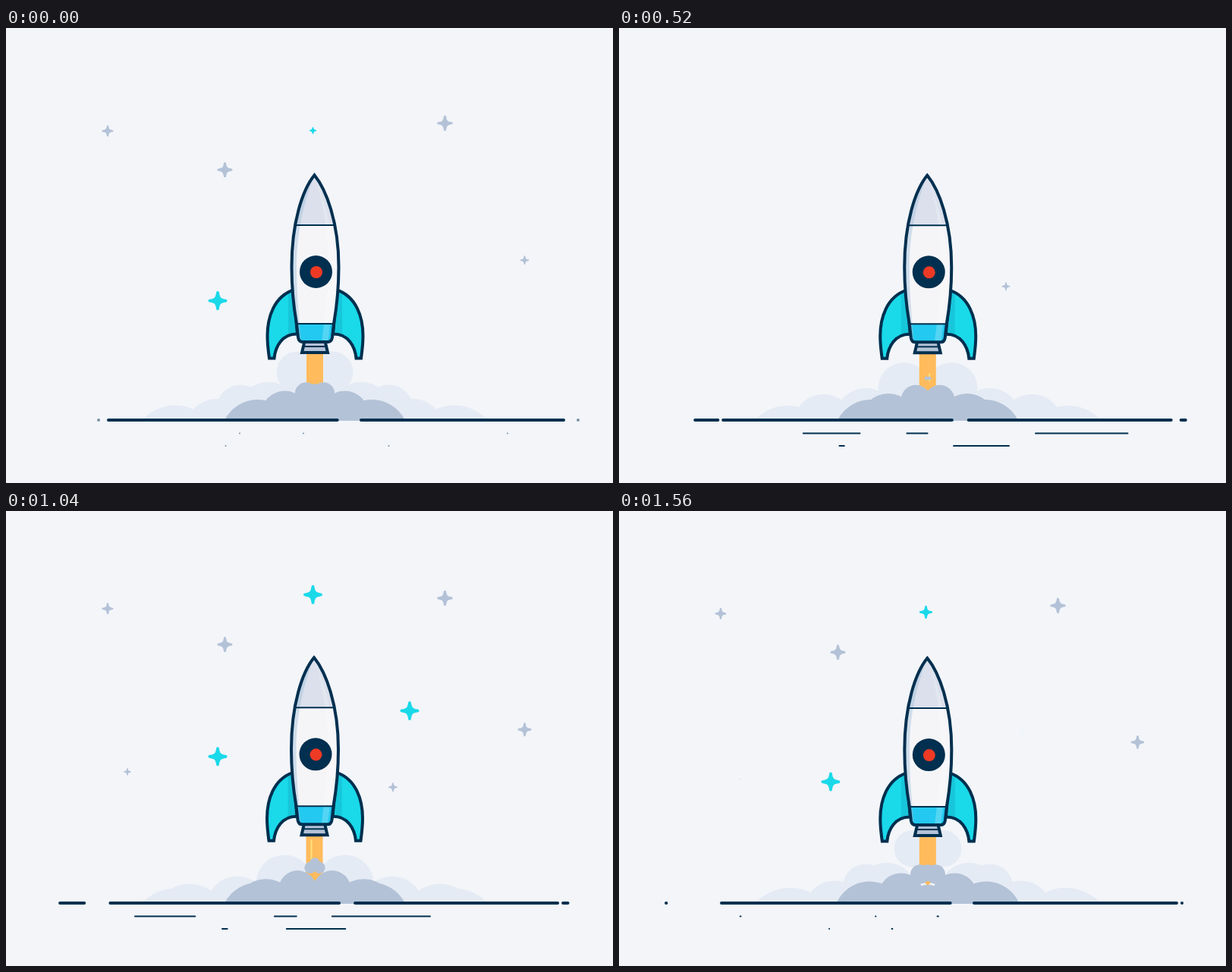
Write an HTML page with a canvas that moves like this. It is 800 by 600 pixels and loops after 1.6 s.

```html
<!DOCTYPE html>
<html lang="en">
<head>
<meta charset="utf-8">
<title>Rocket launch</title>
<style>
  html, body { margin: 0; width: 100%; height: 100%; overflow: hidden; background: #f3f5f9; }
  canvas { display: block; width: 800px; height: 600px; }
</style>
</head>
<body>
<canvas id="stage" width="800" height="600"></canvas>
<script>
const ctx = document.getElementById('stage').getContext('2d');
const LOOP = 1600, PUFF_LOOP = 400, MID = 407, GROUND = 517;
const NAVY = '#002f4f', CYAN = '#1ad9e9', GREY = '#b3c2d7', PALE = '#e5ebf4', FLAME = '#ffbb5c';

// x, y at birth, radius, speed in px/ms, birth time
const stars = [
  [404.5, 90.7, 12.5, .0445, 601],
  [532, 233.4, 12.5, .0575, 519],
  [279, 304.8, 12.5, .064, 745],
  [578.5, 111, 10.2, .0191, 840],
  [288.5, 170.7, 10, .0196, 765],
  [134, 126.3, 7.5, .0125, 837],
  [683.5, 275.3, 9, .032, 637],
  [160, 334.2, 4.8, .019, 530],
  [510, 335.7, 6, .045, 408]
];
const STAR_LIFE = 1046, STAR_RAMP = 125;

// y, start x, end x, sway, width
const dashes = [
  [GROUND, 122, 62, 11.5, 4],
  [GROUND, 754, 742, -10, 4],
  [534.5, 308, 159.7, 13, 2],
  [534.5, 392, 338, 20, 2],
  [534.5, 661, 419.5, 13, 2],
  [551, 289.5, 277, 10, 2],
  [551, 504.5, 359.5, 13, 2]
];

// time, dx, dy
const shake = [[0, 0, 0], [320, 0, 1.7], [720, -.5, -1], [920, -1, -.4], [1160, 0, -1], [1360, -1, .3], [LOOP, 0, 0]];

const clamp = v => Math.max(0, Math.min(1, v));
const sine = v => (1 - Math.cos(Math.PI * clamp(v))) / 2;
const cubic = v => (v = clamp(v)) < .5 ? 4 * v ** 3 : 1 - 4 * (1 - v) ** 3;
const after = (age, start) => Math.max(0, age - start);

// Each puff rule turns an age into [distance from the middle, height, radius]
const paleInner = age => [
  16 + .07 * age + .1 * after(age, 400),
  105 * Math.exp(-age / 680),
  42 * (1 - Math.exp(-(age + 110) / 200))
];
const paleOuter = age => {
  const k = 1 - (1 - (age - 400) / 560) ** 2;
  return [55 + 130 * k, 60 - 41 * k, 29 + 29 * k * k];
};
const darkSide = age => {
  const r = .043 * (age + 236);
  return [.8 * r + .07 * after(age, 300), 52.5 - .028 * age, r];
};
const darkCore = age => [0, 55 - .075 * age, .0365 * (age + 236)];

function disc(x, y, r, color) {
  ctx.fillStyle = color;
  ctx.beginPath();
  ctx.arc(x, y, r, 0, 7);
  ctx.fill();
}

function pair(dx, height, r, color) {
  const y = GROUND - height + r;
  disc(MID - dx, y, r, color);
  disc(MID + dx, y, r, color);
}

function puffs(rule, t, from, to, color) {
  const first = from + ((t + 100 - from) % PUFF_LOOP + PUFF_LOOP) % PUFF_LOOP;
  for (let age = first; age < to; age += PUFF_LOOP) pair(...rule(age), color);
}

function line(x1, y1, x2, y2, width, color, cap = 'round') {
  ctx.strokeStyle = color;
  ctx.lineWidth = width;
  ctx.lineCap = cap;
  ctx.beginPath();
  ctx.moveTo(x1, y1);
  ctx.lineTo(x2, y2);
  ctx.stroke();
}

function fill(path, color) {
  ctx.fillStyle = color;
  ctx.fill(path);
}

function outline(path, color, width) {
  ctx.strokeStyle = color;
  ctx.lineWidth = width;
  ctx.stroke(path);
}

function local(draw) {
  ctx.save();
  draw();
  ctx.restore();
}

const starPath = new Path2D('M0-10.6C1-3 3-1 10.6 0C3 1 1 3 0 10.6C-1 3-3 1-10.6 0C-3-1-1-3 0-10.6Z');
const bodyPath = new Path2D('M406.5 194C391 213 376.5 256 376.5 315C376.5 345 379.5 370 383 390L385 408' +
  'Q386 414 391 414H424Q429 414 430 408L432 390C435.5 370 438.5 345 438.5 315C438.5 256 422 213 406.5 194Z');
const shadePath = new Path2D('M406.5 193C396 222 383 262 383 315C383 350 386 380 389 416H370V193Z');
const glossPath = new Path2D('M406.5 193C414 215 433 262 433 315C433 350 429 380 424 416H416C420 380 425 350 425 315C425 262 414 215 406.5 193Z');
const finPath = new Path2D('M379 345.5C353 354 344.5 382 344.5 406C344.5 418 346 428 347 435.5H353.5C355 420 364 403 384 403.5Z');
const nozzlePath = new Path2D('M393.5 413H420.5L424 428H390Z');
const flamePath = new Path2D('M396 426H418V484L407 494L396 484Z');

function drawStars(t) {
  for (const [x, y, r, speed, birth] of stars) {
    const age = (t - birth + LOOP) % LOOP;
    const size = clamp(Math.min(age, STAR_LIFE - age) / STAR_RAMP) * r / 12.5;
    if (!size) continue;
    local(() => {
      const color = r > 12 ? CYAN : GREY;
      ctx.translate(x, y + speed * age);
      ctx.scale(size, size);
      ctx.lineJoin = 'round';
      fill(starPath, color);
      outline(starPath, color, 3.8);
    });
  }
}

function spark(x, y, length, k) {
  if (k > 0 && k < 1) line(x, y + length * k ** 3, x, y + length * Math.sqrt(k), 2, '#ffe07a', 'butt');
}

function drawFire(t, dx) {
  local(() => {
    ctx.beginPath();
    ctx.rect(0, 0, 800, GROUND + .5);
    ctx.clip();
    pair(185, 19, 58, PALE);
    puffs(paleOuter, t, 400, 960, PALE);
    puffs(paleInner, t, -60, 1000, PALE);
    pair(28, 25, 40, GREY);
    local(() => {
      ctx.translate(dx, 0);
      fill(flamePath, FLAME);
      spark(403, 428, 45, (t - 600) / 900);
      spark(409.5, 455, 24, (t - 240) / 1260);
    });
    pair(75, 27, 49, GREY);
    pair(0, 24, 27, GREY);
    puffs(darkSide, t, -200, 880, GREY);
    puffs(darkCore, t, -120, 440, GREY);
  });
}

function drawFin() {
  fill(finPath, CYAN);
  local(() => {
    ctx.clip(finPath);
    ctx.fillStyle = '#17c6da';
    ctx.fillRect(372, 340, 12, 70);
  });
  outline(finPath, NAVY, 4);
}

function drawBody() {
  const bands = [[190, 70, '#dbe0ec'], [260, 130, '#f5f5f8'], [390, 30, '#23c9f0']];
  local(() => {
    ctx.clip(bodyPath);
    for (const [y, height, color] of bands) {
      ctx.fillStyle = color;
      ctx.fillRect(370, y, 75, height);
    }
    fill(shadePath, 'rgba(160,190,218,.45)');
    fill(glossPath, 'rgba(255,255,255,.22)');
    for (const y of [260, 390]) line(370, y, 445, y, 2, NAVY, 'butt');
  });
  outline(bodyPath, NAVY, 4);
}

function drawRocket(dx, dy) {
  local(() => {
    ctx.translate(dx, dy);
    drawFin();
    local(() => {
      ctx.translate(815, 0);
      ctx.scale(-1, 1);
      drawFin();
    });
    fill(nozzlePath, GREY);
    outline(nozzlePath, NAVY, 4);
    line(392, 420, 422, 420, 2, NAVY, 'butt');
    drawBody();
    disc(408.5, 321.5, 21.5, NAVY);
    disc(409, 322, 8, '#ee3a24');
  });
}

function drawGround(t) {
  const sway = sine(1 - Math.abs(2 * t / LOOP - 1));
  line(135 + 3 * sway, GROUND, 436.7 + 3 * sway, GROUND, 4, NAVY);
  line(468 - 10 * sway, GROUND, 735 - 10 * sway, GROUND, 4, NAVY);
  const head = cubic(t / 1040), tail = sine((t - 520) / 1090);
  ctx.globalAlpha = .5 + .5 * clamp(t / 160);
  for (const [y, from, to, drift, width] of dashes) {
    const x = from + drift * sway, run = to - from;
    line(x + run * head, y, x + run * tail + .01, y, width, NAVY);
  }
  ctx.globalAlpha = 1;
}

function shakeAt(t) {
  const i = shake.findIndex(key => key[0] > t);
  const [t0, x0, y0] = shake[i - 1], [t1, x1, y1] = shake[i];
  const k = (t - t0) / (t1 - t0);
  return [x0 + (x1 - x0) * k, y0 + (y1 - y0) * k];
}

function draw(t) {
  const [dx, dy] = shakeAt(t);
  ctx.fillStyle = '#f3f5f9';
  ctx.fillRect(0, 0, 800, 600);
  drawStars(t);
  drawFire(t, dx);
  drawRocket(dx, dy);
  drawGround(t);
}

const start = performance.now();
function tick() {
  draw((performance.now() - start) % LOOP);
  requestAnimationFrame(tick);
}
tick();
</script>
</body>
</html>
```
